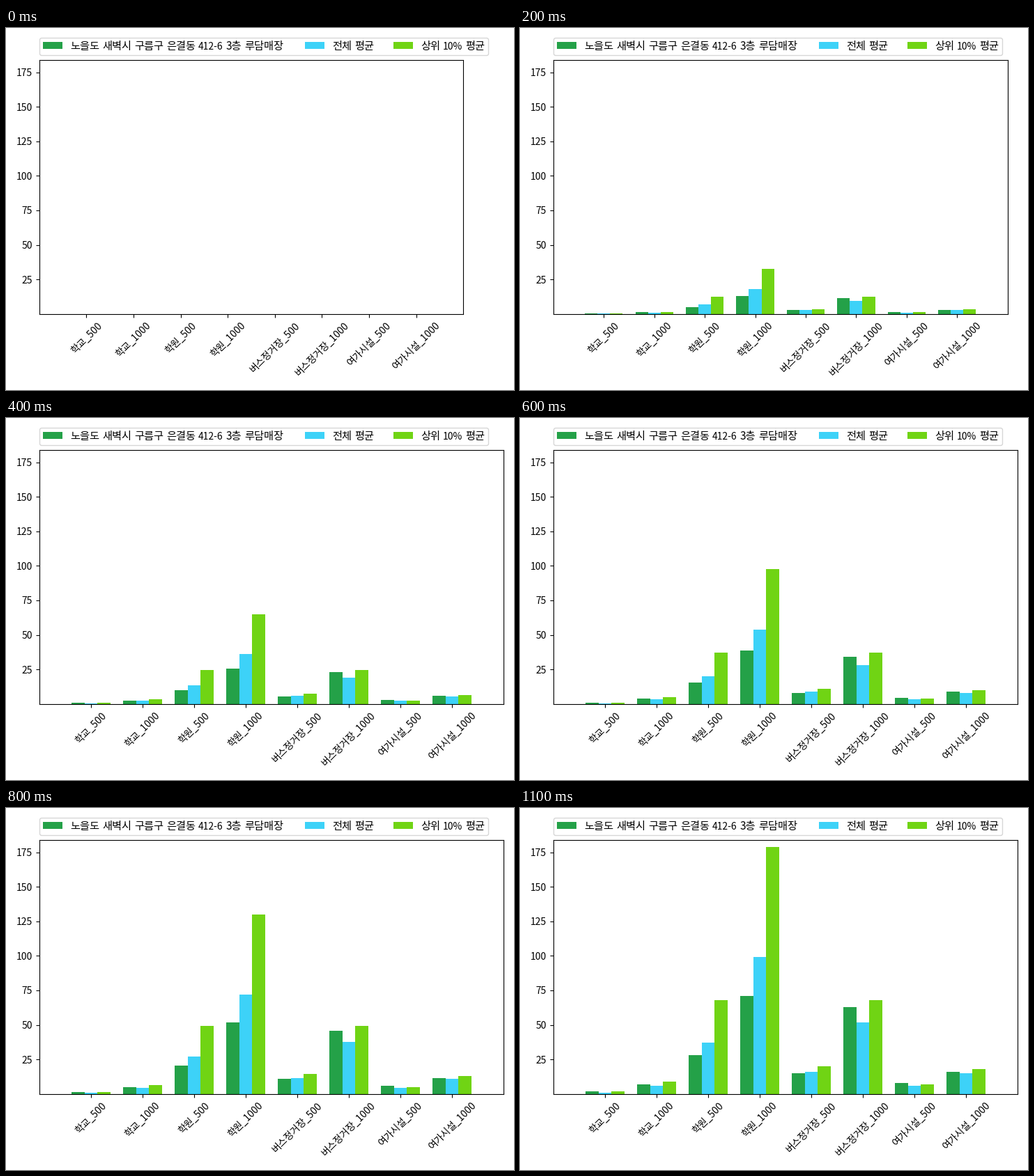
Recreate the animation shown at these times as a matplotlib script. Size 729 by 520 pixels, loop 1.9 s.

```python
import matplotlib.pyplot as plt
from matplotlib.animation import FuncAnimation
from matplotlib.patches import FancyBboxPatch, Rectangle

W, H, DPI = 729, 520, 100
FRAMES, GROW = 19, 11
LEFT, BOTTOM, TOP = 47.8, 109.23, 474.25
LEGEND_RIGHT, PAD = 692.2, 15

PLACES = ["학교", "학원", "버스정거장", "여가시설"]
LABELS = [f"{p}_{r}" for p in PLACES for r in (500, 1000)]
SERIES = [
    ("노을도 새벽시 구름구 은결동 412-6 3층 루담매장", "#24a148", 53,
     [2, 7, 28, 71, 15, 63, 8, 16]),
    ("전체 평균", "#3dd2f8", 429, [1, 6, 37, 99, 16, 52, 6, 15]),
    ("상위 10% 평균", "#70d414", 556, [2, 9, 68, 179, 20, 68, 7, 18]),
]

plt.rcParams.update({"font.family": "Noto Sans CJK JP", "font.size": 10})
fig = plt.figure(figsize=(W / DPI, H / DPI), dpi=DPI, facecolor="white")
ax = fig.add_axes([0, 0, 1, 1])


def add_words(x, baseline, text):
    """Set words side by side; Hangul is a little larger than numerals."""
    for word in text.split():
        size = 10 if word.isascii() else 11
        t = fig.text(x / W, 1 - baseline / H, word, size=size, va="baseline")
        x += t.get_window_extent().width + 4


def add_legend():
    fig.add_artist(FancyBboxPatch(
        (48.5, H - 39.5), 644, 25, transform=None,
        boxstyle="round,pad=0,rounding_size=2.8",
        fc="white", ec="0.8", lw=1, alpha=0.8))
    for name, color, x, _ in SERIES:
        fig.add_artist(Rectangle((x, H - 30), 28, 10, transform=None,
                                 fc=color, lw=0))
        add_words(x + 39, 31, name)


def add_bars():
    """Return (bar, final value) pairs for all series."""
    pairs = []
    for k, (_, color, _, values) in enumerate(SERIES):
        xs = [i + 0.25 * (k - 1) for i in range(1, 9)]
        pairs += zip(ax.bar(xs, [0] * 8, 0.25, color=color), values)
    return pairs


def right_edge(step):
    """Tight-layout passes: each one moves the axes by the legend's overhang."""
    right = 0.9 * W
    for _ in range(min(step, 3)):
        right = W - PAD - max(0, LEGEND_RIGHT - right)
    return right


def update(frame):
    ax.set_position([LEFT / W, BOTTOM / H,
                     (right_edge(frame) - LEFT) / W, (TOP - BOTTOM) / H])
    progress = min(frame / GROW, 1)
    for bar, value in bars:
        bar.set_height(value * progress)
    return [bar for bar, _ in bars]


add_legend()
bars = add_bars()
ax.set_xticks(range(1, 9), LABELS, rotation=45)
ax.set_yticks(range(25, 176, 25))
ax.set_xlim(0, 9)
ax.set_ylim(0, 184)

anim = FuncAnimation(fig, update, frames=FRAMES, interval=100,
                     repeat=True, repeat_delay=0, blit=False)
plt.show()
```
